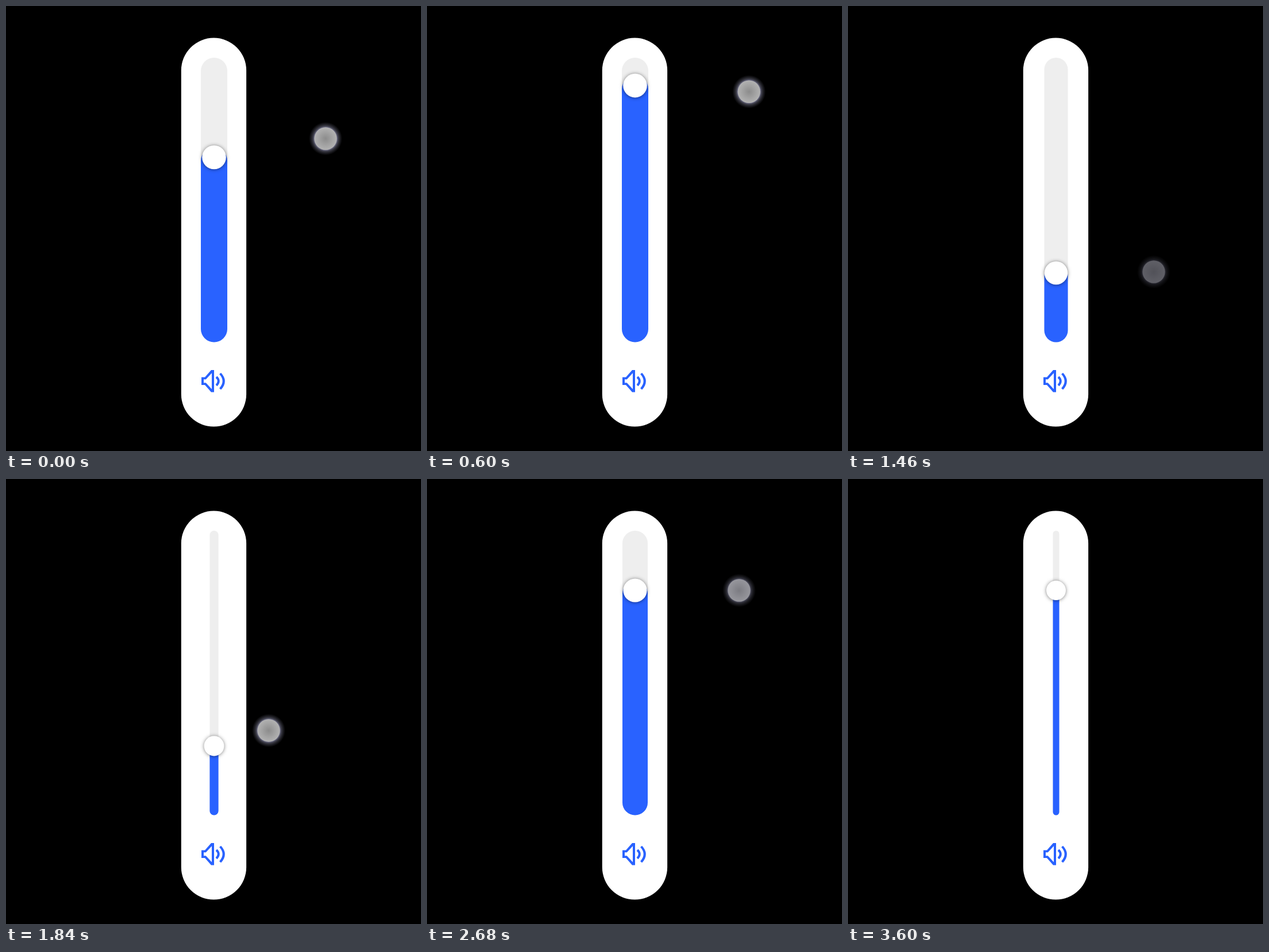
An HTML page with a canvas that plays this animation: 722x775 px, repeating every 3.72 s.

```html
<!DOCTYPE html>
<html lang="en">
<head>
<meta charset="utf-8">
<title>Volume slider</title>
<style>
  html, body { margin: 0; background: #000; overflow: hidden; }
  canvas { display: block; }
</style>
</head>
<body>
<canvas id="stage" width="722" height="775"></canvas>
<script>
const ctx = document.getElementById('stage').getContext('2d');
const LOOP = 3720;
const BLUE = '#2962ff';
const TRACK = { x: 362, top: 90, bottom: 585.5 };

// Turning points of the drag; the hand eases from one to the next
const poses = [
  { t: 0, x: 556, y: 231, thumb: 263.5 },
  { t: 406, x: 568, y: 64, thumb: 54 },
  { t: 1137, x: 521, y: 579, thumb: 565 },
  { t: 1380, x: 538, y: 465, thumb: 465 },
  { t: 1840, x: 457, y: 438, thumb: 465 },
  { t: 2030, x: 550, y: 250, thumb: 170 },
  { t: 2270, x: 485, y: 563, thumb: 457 },
  { t: 2680, x: 543, y: 194, thumb: 194 },
];
const touches = [{ down: -1000, up: 1380 }, { down: 1760, up: 2630 }];

const clamp = (v, lo, hi) => Math.min(hi, Math.max(lo, v));
const ease = u => (1 - Math.cos(Math.PI * clamp(u, 0, 1))) / 2;

function poseAt(t) {
  const i = Math.max(1, poses.findIndex(p => p.t > t));
  const next = t >= poses.at(-1).t ? poses.length - 1 : i;
  const a = poses[next - 1], b = poses[next];
  const u = ease((t - a.t) / (b.t - a.t));
  const mix = key => a[key] + (b[key] - a[key]) * u;
  return { x: mix('x'), y: mix('y'), thumb: clamp(mix('thumb'), 112, 562) };
}

// 0..1: eases in over `rise` ms after a touch, out over `fall` ms after its release
const held = (t, rise, fall) => Math.max(...touches.map(({ down, up }) =>
  ease((t - down) / rise) * (1 - ease((t - up) / fall))));

function pill(x, y, w, h, color) {
  ctx.fillStyle = color;
  ctx.beginPath();
  ctx.roundRect(x, y, w, h, w / 2);
  ctx.fill();
}

function disc(x, y, r, fill) {
  ctx.fillStyle = fill;
  ctx.beginPath();
  ctx.arc(x, y, r, 0, 7);
  ctx.fill();
}

const speaker = new Path2D('M340 646.5H346L357 634H362V672.5H357L346 660H340Z'
  + 'M344 650.3V656.2H347.8L358 667.3V639.2L347.8 650.3Z');
const waves = new Path2D('M366 646Q373.5 653.3 366 660.8M372.6 640Q385 653.3 372.6 667');

function drawIcon() {
  ctx.fillStyle = ctx.strokeStyle = BLUE;
  ctx.lineWidth = 4;
  ctx.fill(speaker, 'evenodd');
  ctx.stroke(waves);
}

function drawSlider(y, open) {
  const width = 11 + 35 * open;
  const left = TRACK.x - width / 2;
  pill(left, TRACK.top, width, TRACK.bottom - TRACK.top, '#eee');
  const fillTop = y - width * 0.37;
  pill(left, fillTop, width, TRACK.bottom - fillTop, BLUE);

  ctx.save();
  ctx.shadowColor = 'rgba(0,0,0,.5)';
  ctx.shadowBlur = 6;
  ctx.shadowOffsetY = 0.5;
  disc(TRACK.x, y, 17 + 3.8 * open, '#fff');
  ctx.restore();
}

function drawPointer(x, y, alpha) {
  ctx.save();
  ctx.globalAlpha = alpha;
  const glow = ctx.createRadialGradient(x, y, 19, x, y, 29);
  glow.addColorStop(0, 'rgba(160,160,200,.75)');
  glow.addColorStop(0.35, 'rgba(135,135,160,.4)');
  glow.addColorStop(1, 'rgba(110,110,130,0)');
  disc(x, y, 29, glow);
  const body = ctx.createRadialGradient(x, y, 0, x, y, 20);
  body.addColorStop(0, '#8c8c8c');
  body.addColorStop(1, '#b3b3b3');
  disc(x, y, 19.7, body);
  ctx.restore();
}

function draw(t) {
  const { x, y, thumb } = poseAt(t);
  ctx.fillStyle = '#000';
  ctx.fillRect(0, 0, 722, 775);
  pill(304.8, 55.6, 113.3, 677, '#fff');
  drawSlider(thumb, held(t, 360, 330));
  drawIcon();
  drawPointer(x, y, held(t, 80, 140));
}

const start = performance.now();
function tick() {
  draw((performance.now() - start) % LOOP);
  requestAnimationFrame(tick);
}
tick();
</script>
</body>
</html>
```
